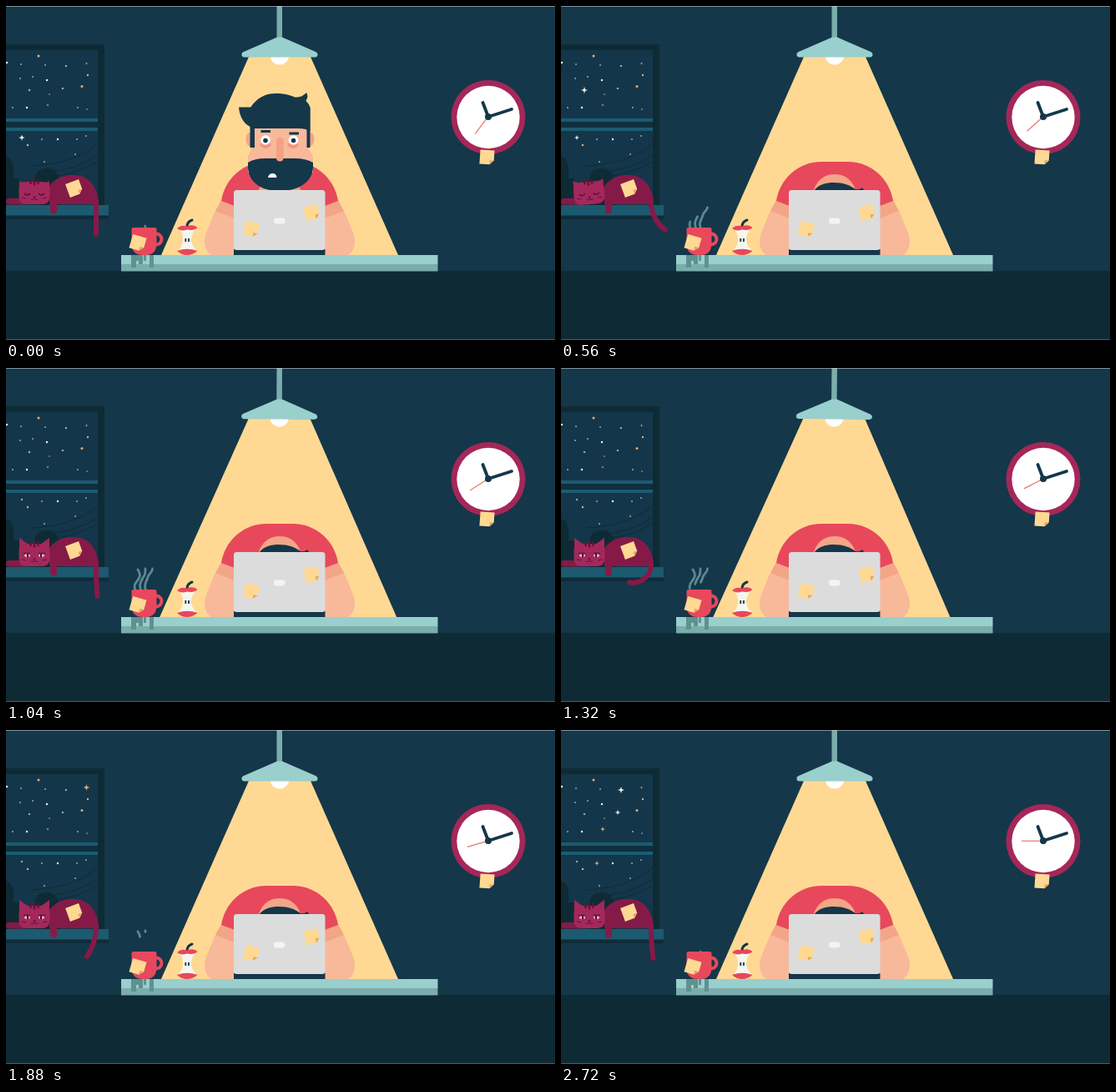
These frames come from a looping animation (658 by 401 pixels, 2.76 s). An HTML page:

```html
<!DOCTYPE html>
<html lang="en">
<head>
<meta charset="utf-8">
<title>Late night at the desk</title>
<style>
html, body { margin: 0; width: 100%; height: 100%; overflow: hidden; background: #14374a; }
svg { display: block; width: 658px; height: 401px; }
</style>
</head>
<body>
<svg viewBox="0 0 658 401" xmlns="http://www.w3.org/2000/svg">
  <defs>
    <g id="note">
      <path d="M-8.5-8.5H8.5V3.5L3.5 8.5H-8.5z" fill="#ffd993"/>
      <path d="M8.5 3.5H3.5V8.5z" fill="#dfa860"/>
    </g>
    <g id="arm">
      <path d="M258 234L249 250L240 272C236 283 238 294 246 299H274V228z" fill="#f8b99b"/>
      <path d="M258 233L251 246L274 255V230z" fill="#f3a588"/>
      <path d="M258 234C262 208 284 187 312 187H328V224L274 240z" fill="#e8485c"/>
    </g>
    <filter id="smear" filterUnits="userSpaceOnUse" x="260" y="80" width="130" height="300">
      <feGaussianBlur id="smearAmount" stdDeviation="0 0"/>
    </filter>
    <clipPath id="pane"><rect y="53" width="110" height="186"/></clipPath>
  </defs>

  <rect width="658" height="401" fill="#14374a"/>

  <!-- window -->
  <path d="M0 46H118V239H0z" fill="#0e2b35"/>
  <path d="M0 53H110V239H0z" fill="#14364a"/>
  <g clip-path="url(#pane)">
    <g fill="none" stroke="#0e2b35" stroke-width="1">
      <path d="M110 165Q84 189 30 192M110 179Q84 197 50 199M110 187Q80 204 50 205"/>
    </g>
    <path d="M0 181Q7 182 9 193V239H0zM34 214Q33 196 47 195Q62 193 65 214V239H34z" fill="#0e2b35"/>
    <path d="M0 207H16V239H0z" fill="#0e2b35"/>
    <g id="stars"></g>
  </g>
  <path d="M0 139H110V146H0z" fill="#0f2f3e"/>
  <path d="M0 135H110V139H0zM0 146H110V150H0z" fill="#1b5c72"/>
  <path d="M0 251H123V256H0z" fill="#0f2c38"/>
  <path d="M0 239H123V251.500H0z" fill="#1c5a70"/>

  <!-- cat -->
  <path id="tail" fill="none" stroke="#851a48" stroke-width="6" stroke-linecap="round"/>
  <path d="M52 238V216Q62 203 80 203C100 203 109 216 111 238z" fill="#851a48"/>
  <path d="M53 225H61V247Q57 253 53 247z" fill="#851a48"/>
  <rect x="0" y="231" width="24" height="7.500" rx="3.700" fill="#851a48"/>
  <use href="#note" transform="translate(82 219) rotate(-20)"/>
  <g id="catHead">
    <path id="ears" d="M16 219V204L27 212H41L52 204V219z" fill="#a4285b"/>
    <path d="M15.500 219Q16 211 25 211H43Q52 211 52.500 219V229Q52 238 43 238H24Q16 238 15.500 229z" fill="#a4285b"/>
    <path d="M29.500 208V214M34 207V215.500M38.500 208V214" stroke="#5c1539" stroke-width="2.400"/>
    <g id="catAwake">
      <ellipse cx="25.500" cy="225" rx="3.500" ry="2" fill="#e8b4b4"/>
      <ellipse cx="42.500" cy="225" rx="3.500" ry="2" fill="#e8b4b4"/>
      <path d="M26 223V227M42 223V227" stroke="#3c1030" stroke-width="2"/>
      <path d="M21 222.500H29M39 222.500H47" stroke="#5c1539" stroke-width="1.500"/>
    </g>
    <path id="catAsleep" d="M22 225Q25.500 229 29 225M39 225Q42.500 229 46 225" fill="none" stroke="#4a1234" stroke-width="1.300"/>
    <path d="M32 228.500H36L34 231z" fill="#5c1539"/>
    <path d="M30 232Q32 234 34 231Q36 234 38 232M19 230L24 231M49 230L44 231" fill="none" stroke="#5c1539"/>
  </g>

  <!-- clock -->
  <circle cx="578" cy="133.500" r="44.500" fill="#a52759"/>
  <circle cx="578" cy="133.500" r="37.700" fill="#fff"/>
  <path id="second" d="M577.500 133.200H603" stroke="#e5776f" stroke-width="1.200"/>
  <path d="M578 133L571.500 116M578 133L606 124" stroke="#14374a" stroke-width="3.800" stroke-linecap="round"/>
  <circle cx="578" cy="133" r="4" fill="#14374a"/>
  <use href="#note" transform="translate(576.500 181.500) rotate(4)"/>

  <!-- lamp -->
  <g id="lamp">
    <path d="M291 61H365L472.200 304H183.800z" fill="#ffd993"/>
    <path d="M324.500 0H331V40H324.500z" fill="#7aadab"/>
    <path d="M317 60A11 10.500 0 0 0 339 60z" fill="#fff"/>
    <path d="M325 37.500H331L370 54.500Q374 56 373.500 59Q373 61.500 370 61.500H286Q282.500 61.500 282.500 58.500Q282 56 286 54.500z" fill="#99cfcd"/>
  </g>

  <!-- man -->
  <path d="M268 234H388V293H268z" fill="#e8485c"/>
  <use href="#arm"/>
  <use href="#arm" transform="matrix(-1 0 0 1 656 0)"/>
  <path d="M300 240C300 214 312 202 328 202S356 214 356 240z" fill="#f3a588"/>
  <path id="nape" d="M303 222C309 214 318 212 327 212C339 212 346 215 353 220Q358 221 361 218L364 222z" fill="#14374a"/>
  <g id="head">
    <ellipse cx="292" cy="160" rx="4.500" ry="8" fill="#f3a588"/>
    <ellipse cx="365" cy="160" rx="4.500" ry="8" fill="#f3a588"/>
    <path d="M294 125H363V172L368 180V200H290V180L294 172z" fill="#f8b99b"/>
    <path d="M304 165A7 6 0 0 0 318 165zM337 165A7 6 0 0 0 351 165z" fill="#f0977f"/>
    <circle cx="311" cy="161" r="5.800" fill="#fff"/>
    <circle cx="344.500" cy="161" r="5.800" fill="#fff"/>
    <circle cx="311" cy="161.500" r="2.800" fill="#14374a"/>
    <circle cx="344.500" cy="161.500" r="2.800" fill="#14374a"/>
    <path d="M305.500 150.500H317M339.500 153H351" stroke="#14374a" stroke-width="3.200"/>
    <path d="M290 188Q298 183 310 183H347Q359 183 368 188V194C367 212 350 222 328 222S291 212 290 194z" fill="#14374a"/>
    <path d="M324 162Q324 158 328.300 158T332.600 162V182Q332.600 186.500 328.300 186.500T324 182z" fill="#f3a182"/>
    <path d="M314 206Q315 201 319.500 201T324.500 206z" fill="#fff"/>
    <g fill="#14374a">
      <path d="M292.500 132H298V170H292.500zM360.500 122H364.500V170H360.500z"/>
      <path d="M279 121.500H364.500V150Q359 147 350 147H298C286 144 280 134 279 121.500z"/>
      <path id="crown" d="M293 122C300 111 310 105 323 105C333 105 341 107 346 109.500Q355 110 360 104Q363 108 359.500 114Q363 117 364.500 122z"/>
    </g>
  </g>

  <!-- laptop -->
  <path d="M273 292H382.500V299H273z" fill="#14374a"/>
  <rect x="273" y="221" width="109.500" height="72" rx="3.500" fill="#dcdcdd"/>
  <rect x="321" y="254.500" width="13.500" height="7" rx="3" fill="#f0f5f0"/>
  <use href="#note" transform="translate(294 268) rotate(13)"/>
  <use href="#note" transform="translate(366.500 248) rotate(-13)"/>

  <!-- desk -->
  <path d="M0 318H658V401H0z" fill="#0e2b35"/>
  <path d="M138 299H517.500V310H138z" fill="#99cfcd"/>
  <path d="M138 310H517.500V318.500H138z" fill="#7aadab"/>
  <path d="M150 299H164V310H159V306H156V314H150zM165 299H168V306H165zM172 299H177V314H172z" fill="#5f9190"/>

  <!-- mug and apple core -->
  <g id="steam" fill="none" stroke="#5b8a90" stroke-width="2.800" stroke-linecap="round"></g>
  <circle cx="180" cy="280" r="6.500" fill="none" stroke="#e8485c" stroke-width="4"/>
  <path d="M150.500 268Q150.500 266 152.500 266H178.500Q180.500 266 180.500 268V285Q180.500 299 167 299H164Q150.500 299 150.500 285z" fill="#e8485c"/>
  <use href="#note" transform="translate(158 284.500) rotate(16)"/>
  <path d="M217 265Q217 259 223 257" fill="none" stroke="#14374a" stroke-width="3" stroke-linecap="round"/>
  <path d="M207 267H228C220 275 220 285 228 293H207C214 285 214 275 207 267z" fill="#f5f7ee"/>
  <path d="M205 267Q210 262 217 264.500Q225 261.500 229.500 266Q226 270 217 268.500Q209 271 205 267zM205 294Q217 289.500 229.500 294Q224 299 217 299T205 294z" fill="#e8485c"/>
  <path d="M215.300 279V283M219 279V283" stroke="#14374a" stroke-width="1.800"/>

  <path d="M0 0H658V1H0z" fill="#c8d2d5" opacity=".6"/>
  <path d="M0 400H658V401H0z" fill="#c8d2d5" opacity=".3"/>
</svg>
<script>
const LOOP = 2760, STEP = 40;
const $ = id => document.getElementById(id);
const set = (el, name, value) => el.setAttribute(name, value);
const clamp = x => Math.max(0, Math.min(1, x));
const smooth = x => x * x * (3 - 2 * x);

function add(parent, tag, attrs) {
  const el = document.createElementNS('http://www.w3.org/2000/svg', tag);
  for (const name in attrs) set(el, name, attrs[name]);
  return parent.appendChild(el);
}

function tween(keys, t) {
  let i = 0;
  while (i < keys.length - 2 && t >= keys[i + 1][0]) i++;
  const [t0, a] = keys[i], [t1, b] = keys[i + 1];
  return a + (b - a) * smooth(clamp((t - t0) / (t1 - t0)));
}

const WHITE = '#f3f5ee', AMBER = '#e5ad73';
const dots = [[1, 68], [18, 70], [47, 71], [98, 83], [32, 85], [17, 87], [49, 89],
  [52, 106], [8, 122], [25, 122], [86, 122], [97, 124], [62, 160], [85, 160],
  [96, 156], [26, 167], [46, 187], [83, 178]];
dots.forEach(([x, y], i) => add($('stars'), 'circle',
  { cx: x, cy: y, r: i % 3 ? 0.8 : 1.2, fill: i % 4 == 3 ? AMBER : WHITE }));
for (const [cx, cy] of [[39, 60], [91, 96.500]])
  add($('stars'), 'circle', { cx, cy, r: 1.5, fill: AMBER });

// x, y, colour, peak time, half width of the pulse
const sparks = [[28, 101, WHITE, 500, 620], [19, 158, WHITE, 200, 800],
  [96.500, 69, AMBER, 1960, 520],
  [50, 119, AMBER, 2500, 460], [43, 160, AMBER, 2500, 460],
  [68, 99, WHITE, 2560, 460], [72, 72, WHITE, 2740, 360]
].map(([x, y, fill, peak, width]) => ({
  x, y, peak, width,
  el: add($('stars'), 'path', { d: 'M0-4L1-1L4 0L1 1L0 4L-1 1L-4 0L-1-1z', fill })
}));

// path, start of growth, start of fading
const steam = [
  ['M169 269c-6-8 0-13 1-18c2-6 5-4 5.500-10', 0, 1080],
  ['M163 269c-5-8-1-13 1-17c3-4 3-6 3-11', 280, 1140],
  ['M156 268c-5-8 1-11 3-15c3-4 1-8-1-11', 450, 1320]
].map(([d, grow, fade]) => {
  const el = add($('steam'), 'path', { d });
  return { el, grow, fade, len: el.getTotalLength() };
});

const tailBend = [[0, 0], [360, 0], [760, 1.9], [1320, -1.75], [1880, -0.6],
  [2360, -0.2], [2720, 0.12], [2760, 0.1]];
const catTilt = [[440, 0], [720, -13], [800, -13], [1040, 0]];

function drawTail(bend) {
  let d = 'M104 221Q108 228 108 236';
  for (let i = 1; i <= 12; i++) {
    const s = 38 * i / 12, a = bend * i / 12;
    const x = Math.abs(a) < 1e-3 ? 0 : s * (1 - Math.cos(a)) / a;
    const y = Math.abs(a) < 1e-3 ? s : s * Math.sin(a) / a;
    d += `L${(108 + x).toFixed(2)} ${(236 + y).toFixed(2)}`;
  }
  set($('tail'), 'd', d);
}

// The head drops while its crown tips into view.
function drawHead(t) {
  const q = clamp((t - 120) / 400), p = q * q;
  set($('head'), 'display', p < 1 ? 'inline' : 'none');
  set($('nape'), 'display', p < 1 ? 'none' : 'inline');
  set($('head'), 'transform', `translate(0 ${138 * p})`);
  set($('crown'), 'transform', `translate(0 122) scale(1 ${1 + 2.1 * p}) translate(0 -122)`);
  if (p > 0) {
    set($('smearAmount'), 'stdDeviation', `${0.8 * q} ${6 * q}`);
    set($('head'), 'filter', 'url(#smear)');
  } else $('head').removeAttribute('filter');
}

function drawCat(t) {
  const awake = smooth(clamp((t - 480) / 240));
  set($('catHead'), 'transform', `rotate(${tween(catTilt, t)} 34 228)`);
  set($('ears'), 'transform', `translate(0 ${(1 - awake) * 129}) scale(1 ${0.4 + 0.6 * awake})`);
  set($('catAwake'), 'opacity', awake > 0.5 ? 1 : 0);
  set($('catAsleep'), 'opacity', awake > 0.5 ? 0 : 1);
  drawTail(tween(tailBend, t));
}

function drawSteam(t) {
  const age = (t + 120) % LOOP;
  for (const { el, grow, fade, len } of steam) {
    const head = clamp((age - grow) / 700), tail = clamp((age - fade) / 900);
    set(el, 'display', head > tail ? 'inline' : 'none');
    set(el, 'stroke-dasharray', `${(head - tail) * len} 99`);
    set(el, 'stroke-dashoffset', -tail * len);
  }
}

function draw(t) {
  drawHead(t);
  drawCat(t);
  drawSteam(t);
  set($('second'), 'transform', `rotate(${127 + 53 * t / 2720} 577.5 133.2)`);
  const sway = Math.sin(Math.PI * clamp((t - 760) / 1120)) ** 2;
  set($('lamp'), 'transform', `rotate(${0.58 * sway} 328 0)`);
  for (const s of sparks) {
    const glow = smooth(clamp(1 - Math.abs(t - s.peak) / s.width));
    set(s.el, 'transform', `translate(${s.x} ${s.y}) scale(${0.4 + 0.6 * glow})`);
  }
}

const start = performance.now();
function tick() {
  const t = (performance.now() - start) % LOOP;
  draw(Math.floor(t / STEP) * STEP);
  requestAnimationFrame(tick);
}
tick();
</script>
</body>
</html>
```
